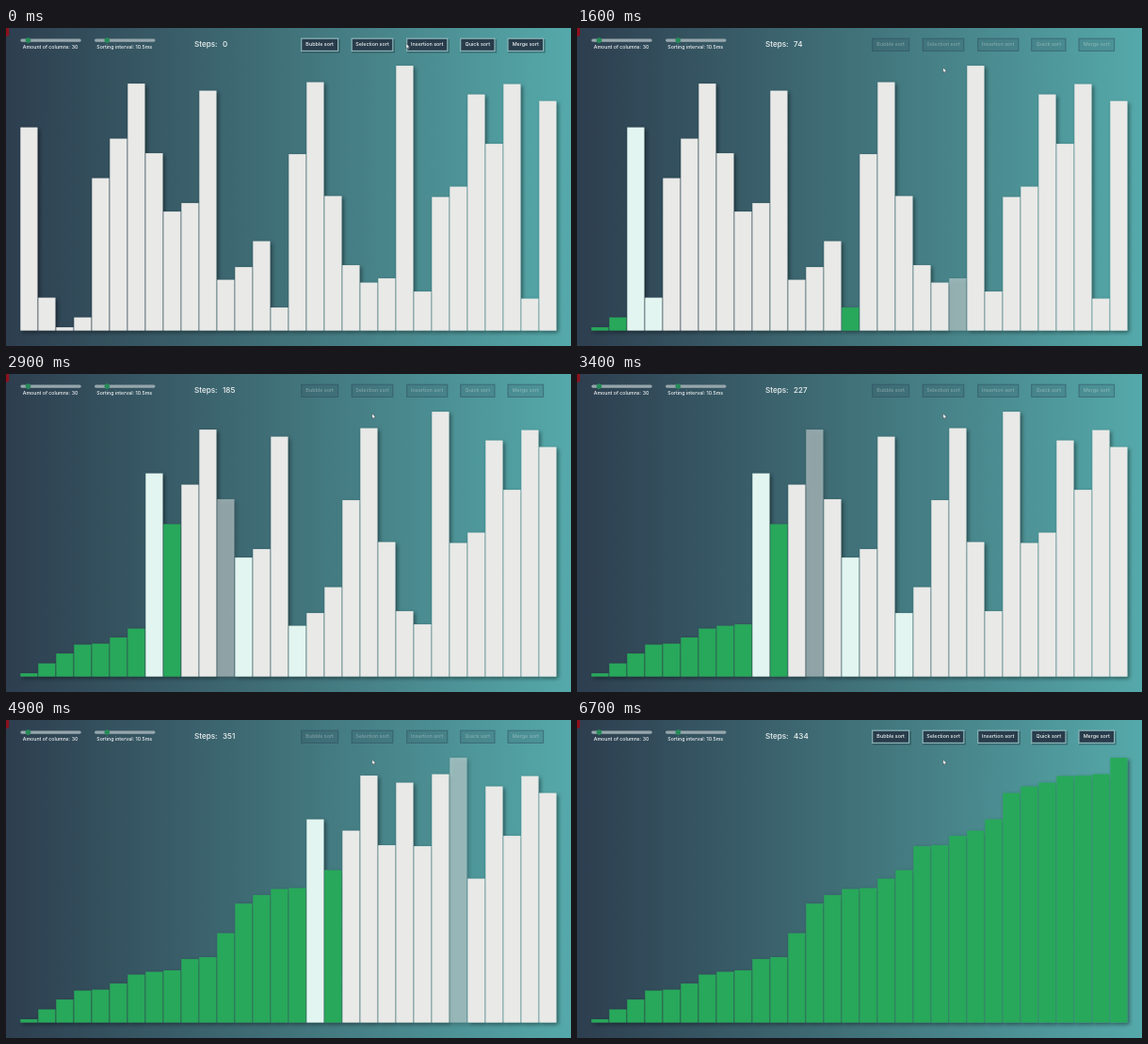
Recreate the animation shown at these times as an HTML page. Size 600x338 px, loop 6800 ms.

```html
<!DOCTYPE html>
<html lang="en">
<head>
<meta charset="utf-8">
<title>Sorting columns</title>
<style>
html, body { margin: 0; width: 100%; height: 100%; overflow: hidden; }
#stage {
  display: block; width: 600px; height: 338px;
  background: linear-gradient(to right, #2d3e4f, #407078 48%, #55a9aa);
}
text { font-family: Montserrat, Inter, "Open Sans", sans-serif; font-weight: 500; fill: #f0f3f3; }
.small { font-size: 5.25px; text-anchor: middle; }
.label { font-size: 5.4px; text-anchor: middle; }
.steps { font-size: 8.1px; }
</style>
</head>
<body>
<svg id="stage" width="600" height="338" viewBox="0 0 600 338">
  <!-- Shadow only outside the columns, so it does not darken a translucent one. -->
  <filter id="shadow" filterUnits="userSpaceOnUse" x="0" y="20" width="600" height="318"
    color-interpolation-filters="sRGB">
    <feGaussianBlur in="SourceAlpha" stdDeviation="2"/>
    <feOffset dx="2" dy="2"/>
    <feComponentTransfer><feFuncA type="linear" slope=".45"/></feComponentTransfer>
    <feComposite operator="out" in2="SourceAlpha" result="outer"/>
    <feMerge><feMergeNode in="outer"/><feMergeNode in="SourceGraphic"/></feMerge>
  </filter>
  <g id="cols" filter="url(#shadow)"></g>
  <g id="head">
    <path d="M0 0H3.2V8H1.5V9H0Z" fill="#8c101c"/>
    <text class="small" x="47" y="22.4">Amount of columns: 30</text>
    <text class="small" x="125.7" y="22.4">Sorting interval: 10.5ms</text>
    <text class="steps" x="200" y="19.9">Steps:</text>
    <text class="steps" id="count" x="230" y="19.9">0</text>
    <g id="off"></g>
    <g id="on"></g>
  </g>
  <path id="cursor" d="M0 0V5.2L1.2 4.2L2 6L2.9 5.6L2.1 3.9H3.7Z" fill="#fff" stroke="#24343c" stroke-width=".4"/>
</svg>
<script>
const LOOP = 6800, BASE = 321.6, PITCH = 19, LEFT = 15.3, WIDTH = 18.2;
const heights = [216, 35, 3.5, 14, 162, 204, 262.5, 188.5, 126.5, 135.5,
  255, 54, 67.5, 95, 24.5, 187.5, 264, 143, 69.5, 51,
  55.5, 281.5, 41.5, 142, 153, 251, 198.5, 262, 34, 244];
const N = heights.length;
const IDLE = '#e9e9e7', SEEN = '#e3f5f0', GREEN = '#28a85a';

// [ms, tick], [ms, x, y], [ms, opacity]
const pace = [[740, 0], [1600, 76.5], [2300, 139.5], [3400, 236.5],
  [4300, 314.5], [5500, 420.5], [5995, 464]];
const path = [[0, 425, 16.5], [150, 425, 16.5], [600, 390, 17], [800, 390, 17], [1300, 388.8, 42]];
const enabled = [[740, 1], [1100, 0], [6000, 0], [6450, 1]];

const $ = id => document.getElementById(id);
const head = $('head'), on = $('on'), off = $('off');

function set(el, attrs) {
  for (const k in attrs) el.setAttribute(k, attrs[k]);
}

function add(parent, tag, attrs, text) {
  const el = document.createElementNS('http://www.w3.org/2000/svg', tag);
  set(el, attrs);
  if (text) el.textContent = text;
  parent.appendChild(el);
  return el;
}

function slider(x, thumb) {
  add(head, 'rect', { x, y: 11.4, width: 64.5, height: 3.4, rx: 1.7, fill: '#96a6ac' });
  add(head, 'circle', { cx: thumb, cy: 13.1, r: 2.8, fill: '#278a59' });
}

function button(x, width, name) {
  const label = { class: 'label', x: x + width / 2, y: 19.2 };
  const box = { x: x + .7, y: 11.2, width: width - 1.4, height: 13.2 };
  add(off, 'rect', { ...box, fill: '#283c4b', 'fill-opacity': .16,
    stroke: '#2c4757', 'stroke-opacity': .5 });
  add(off, 'text', { ...label, 'fill-opacity': .36 }, name);
  add(on, 'rect', { x: x + 1, y: 12, width: width + .5, height: 14.5, fill: '#142630', 'fill-opacity': .35 });
  add(on, 'rect', { ...box, fill: '#283c4b', stroke: '#8bb5b9', 'stroke-width': 1.2 });
  add(on, 'text', label, name);
}

slider(15.3, 23.5);
slider(94, 107.3);
button(313, 40.3, 'Bubble sort');
button(366.5, 45, 'Selection sort');
button(425, 44.5, 'Insertion sort');
button(482, 37.7, 'Quick sort');
button(532.3, 39, 'Merge sort');

const cols = heights.map((h, i) => add($('cols'), 'rect', { x: LEFT + PITCH * i, width: WIDTH }));

// Linear interpolation of column k in a table whose first column is the time.
function at(table, t, k = 1) {
  if (t <= table[0][0]) return table[0][k];
  for (let i = 1; i < table.length; i++) {
    const a = table[i - 1], b = table[i];
    if (t <= b[0]) return a[k] + (b[k] - a[k]) * (t - a[0]) / (b[0] - a[0]);
  }
  return table[table.length - 1][k];
}

// Selection sort after the given tick; each pass ends with one tick for the move.
function sortState(tick) {
  const s = { list: heights.map(h => ({ h, color: IDLE })), check: -1, steps: 0 };
  const list = s.list;
  let n = 0, compared = 0;
  for (let i = 0; i < N - 1; i++) {
    let min = i;
    for (let j = i + 1; j < N; j++) {
      if (n++ > tick) return s;
      if (min === i) list[i].color = GREEN;
      s.check = j;
      s.steps = compared++;
      if (list[j].h < list[min].h) {
        list[min].color = SEEN;
        list[j].color = GREEN;
        min = j;
      } else {
        list[j].color = IDLE;
      }
    }
    if (n++ > tick) return s;
    s.check = -1;
    list.splice(i, 0, list.splice(min, 1)[0]);
    list[i].color = GREEN;
  }
  list[N - 1].color = GREEN;
  return s;
}

function draw(t) {
  const s = sortState(t < pace[0][0] ? -1 : Math.floor(at(pace, t)));
  cols.forEach((el, i) => {
    const { h, color } = s.list[i];
    set(el, { y: BASE - h, height: h, fill: color, opacity: i === s.check ? .5 : 1 });
  });
  $('count').textContent = s.steps;
  const shown = at(enabled, t);
  set(on, { opacity: shown });
  set(off, { opacity: 1 - shown });
  set($('cursor'), { transform: `translate(${at(path, t, 1)} ${at(path, t, 2)})` });
}

const start = performance.now();
function tick() {
  draw((performance.now() - start) % LOOP);
  requestAnimationFrame(tick);
}
tick();
</script>
</body>
</html>
```
